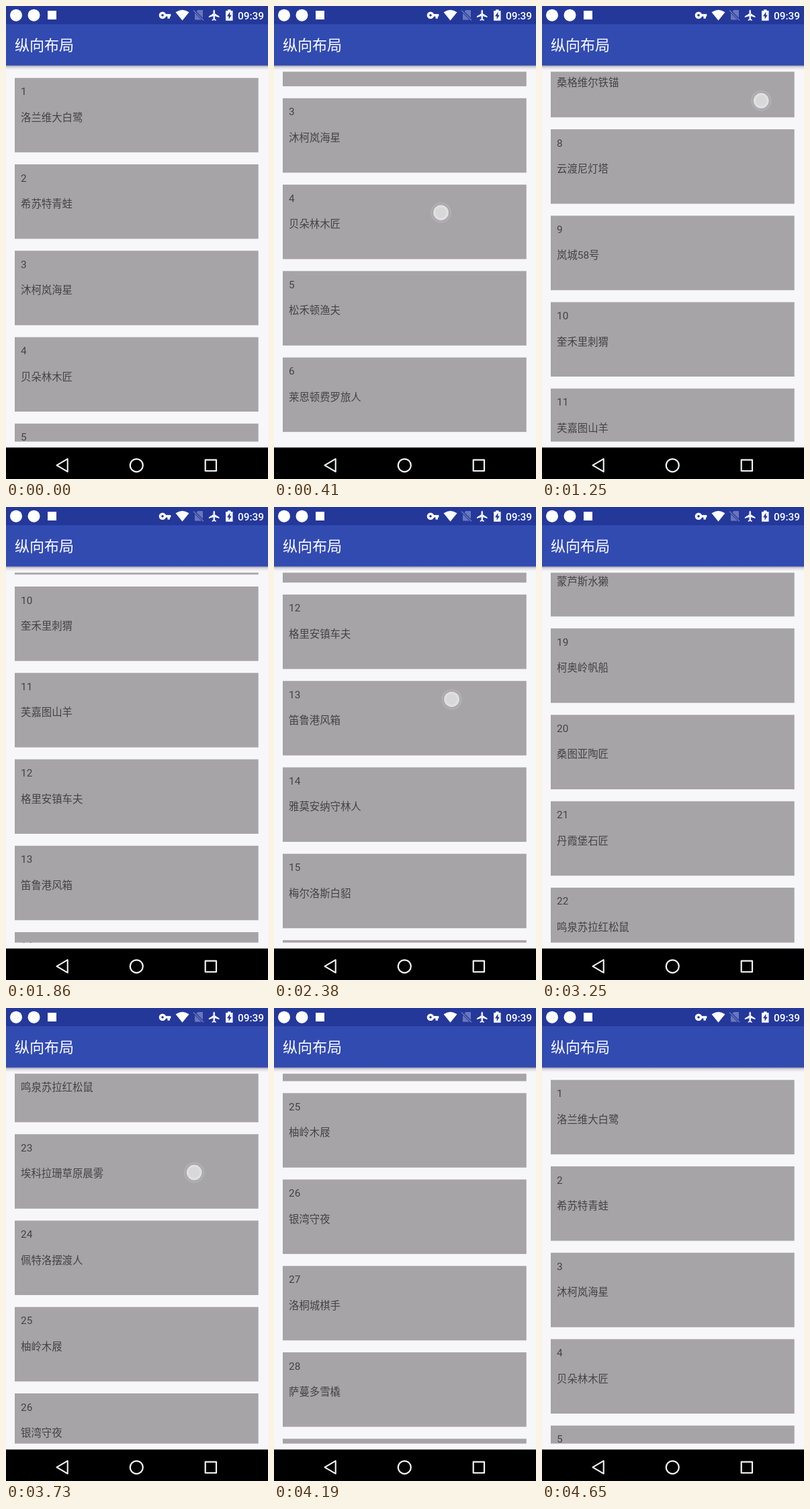
An HTML page with a canvas for the animation above (5.1 s loop, 390 by 702 pixels).

```html
<!DOCTYPE html>
<html lang="zh-CN">
<head>
<meta charset="utf-8">
<title>纵向布局</title>
<style>
html, body { margin: 0; width: 100%; height: 100%; overflow: hidden; background: #f7f6f9; }
canvas { display: block; width: 390px; height: 702px; }
</style>
</head>
<body>
<canvas id="stage"></canvas>
<script>
const W = 390, H = 702, LOOP = 5100;
const canvas = document.getElementById('stage');
const dpr = window.devicePixelRatio || 1;
canvas.width = W * dpr;
canvas.height = H * dpr;
const ctx = canvas.getContext('2d');
ctx.scale(dpr, dpr);

const FONT = 'Roboto, "Noto Sans CJK SC", "Noto Sans CJK", sans-serif';
const PITCH = 128.25;
const teams = ('洛兰维大白鹭 希苏特青蛙 沐柯岚海星 贝朵林木匠 松禾顿渔夫 莱恩顿费罗旅人 ' +
  '桑格维尔铁锚 云渡尼灯塔 岚城58号 奎禾里刺猬 芙嘉图山羊 格里安镇车夫 笛鲁港风箱 ' +
  '雅莫安纳守林人 梅尔洛斯白貂 塔兰斯漂流客 秋斯屯纸鸢 蒙芦斯水獭 柯奥岭帆船 ' +
  '桑图亚陶匠 丹霞堡石匠 鸣泉苏拉红松鼠 埃科拉珊草原晨雾 佩特洛摆渡人 柚岭木屐 ' +
  '银湾守夜 洛桐城棋手 萨蔓多雪橇 费宁斯驼鹿 林泽湾信鸽').split(' ');

// The screen refreshes in bursts of up to eight even steps
const bursts = [230, 790, 1330, 1860, 2480, 3010, 3630, 4190];
const STEP = 74;

// Each swipe drags and flings the list to an offset; grip is where the finger lands
const swipes = [
  { start: 188, span: 500, to: 462, grip: 533, x: 386.5 },
  { start: 1009, span: 560, to: 1143, grip: 500, x: 389.5 },
  { start: 2158.6, span: 600, to: 1669.25, grip: 530, x: 393 },
  { start: 2950, span: 540, to: 2455, grip: 530, x: 390 },
  { start: 3556.8, span: 500, to: 3300, grip: 530, x: 390 },
  { start: 4130, span: 500, to: 0 }];
const RELEASE = 0.41;

function refreshTime(t) {
  const start = bursts.findLast(b => b <= t);
  if (start === undefined) return 0;
  return start + STEP * Math.min(7, Math.floor((t - start) / STEP));
}

// Quick pull, long glide
const glide = p => 1 - (1 - p) ** 3 * (1 + 3 * p);

function pose(t) {
  let scroll = 0, finger = null;
  for (const { start, span, to, grip, x } of swipes) {
    if (t < start) break;
    const p = Math.min(1, (t - start) / span);
    const moved = (to - scroll) * glide(p);
    if (grip && p < RELEASE) {
      const y = grip - moved;
      finger = { x: x - 0.45 * y, y };
    }
    scroll += moved;
  }
  return { scroll, finger };
}

function rect(x, y, w, h, color) {
  ctx.fillStyle = color;
  ctx.fillRect(x, y, w, h);
}

function disc(x, y, r, color) {
  ctx.fillStyle = color;
  ctx.beginPath();
  ctx.arc(x, y, r, 0, Math.PI * 2);
  ctx.fill();
}

function poly(points, color) {
  ctx.fillStyle = color;
  ctx.beginPath();
  points.forEach(([x, y]) => ctx.lineTo(x, y));
  ctx.closePath();
  ctx.fill();
}

function line(points, color, width, closed) {
  ctx.strokeStyle = color;
  ctx.lineWidth = width;
  ctx.beginPath();
  points.forEach(([x, y]) => ctx.lineTo(x, y));
  if (closed) ctx.closePath();
  ctx.stroke();
}

function text(str, x, y, size, color, weight = 400) {
  ctx.font = `${weight} ${size}px ${FONT}`;
  ctx.fillStyle = color;
  ctx.fillText(str, x, y);
}

function drawList(scroll) {
  ctx.save();
  ctx.beginPath();
  ctx.rect(0, 97.4, W, 549);
  ctx.clip();
  teams.forEach((name, i) => {
    const y = 106.75 + i * PITCH - scroll;
    if (y < -20 || y > 650) return;
    rect(13, y, 362.7, 110.5, '#a6a4a7');
    text(i + 1, 22, y + 25.5, 15.4, '#444347');
    text(name, 22, y + 64, 15.4, '#444347');
  });
  ctx.restore();
}

function drawStatus() {
  const bar = '#24389a', white = '#fff', dim = '#6977bb';
  rect(0, 0, W, 27, bar);
  disc(15, 13.7, 9, white);
  disc(41.5, 13.7, 9, white);
  rect(62, 7, 13, 13, white);

  // key
  disc(233, 13.7, 5.3, white);
  rect(236, 11.9, 9.3, 3.6, white);
  rect(240.5, 13, 3.4, 5.6, white);
  disc(233, 13.7, 1.8, bar);

  // signal fan
  ctx.fillStyle = white;
  ctx.beginPath();
  ctx.moveTo(262.5, 21.5);
  ctx.lineTo(252.5, 9.3);
  ctx.quadraticCurveTo(262.5, 2.3, 272.5, 9.3);
  ctx.fill();

  // missing card
  poly([[285.5, 6], [293, 6], [293, 20.5], [281, 20.5], [281, 10.5]], dim);
  line([[279, 6.2], [295, 22]], bar, 3.6);
  line([[279, 6.5], [294, 21.3]], dim, 1.5);

  // plane, mirrored about its axis
  const side = [[0, 5.3], [1.3, 7], [1.3, 11.2], [7.8, 15.2], [7.8, 17], [1.3, 15],
    [1.3, 19.2], [3.1, 20.5], [3.1, 21.8], [0, 20.9]];
  for (const dir of [-1, 1]) poly(side.map(([x, y]) => [309.7 + dir * x, y]), white);

  // battery
  rect(330, 5.3, 4.5, 2.5, white);
  rect(327, 7, 10.5, 14.7, white);
  poly([[333.4, 8.8], [329, 15.2], [331.6, 15.2], [331.6, 19.8], [335.8, 13.4],
    [333.4, 13.4]], bar);

  text('09:39', 345, 19.6, 15.4, white, 500);
}

function drawHeader() {
  const shade = ctx.createLinearGradient(0, 88, 0, 95);
  shade.addColorStop(0, 'rgba(40,40,60,.45)');
  shade.addColorStop(0.4, 'rgba(40,40,60,.14)');
  shade.addColorStop(1, 'rgba(40,40,60,0)');
  rect(0, 88, W, 7, shade);
  rect(0, 27, W, 61.3, '#324bb1');
  text('纵向布局', 13, 66, 22, '#fff');
}

function drawNav() {
  const ink = '#f4f4f4';
  rect(0, 655.3, W, 47, '#000');
  ctx.lineJoin = 'round';
  line([[75.5, 681.7], [91.7, 672.2], [91.7, 691.2]], ink, 2.1, true);
  line([[296.7, 673.7], [313, 673.7], [313, 690], [296.7, 690]], ink, 2.2, true);
  ctx.beginPath();
  ctx.arc(194.3, 681.8, 9.5, 0, Math.PI * 2);
  ctx.stroke();
}

function drawFinger({ x, y }) {
  disc(x, y, 15.5, 'rgba(205,204,210,.25)');
  disc(x, y, 12.4, 'rgba(130,130,135,.35)');
  disc(x, y, 11.5, '#e0dfe3');
  disc(x, y, 8, '#d8d7da');
}

function draw(time) {
  const { scroll, finger } = pose(refreshTime(time % LOOP));
  rect(0, 0, W, H, '#f7f6f9');
  drawList(scroll);
  drawHeader();
  drawStatus();
  drawNav();
  if (finger) drawFinger(finger);
}

let begin;
function tick(now) {
  begin ??= now;
  draw(now - begin);
  requestAnimationFrame(tick);
}
draw(0);
requestAnimationFrame(tick);
</script>
</body>
</html>
```
